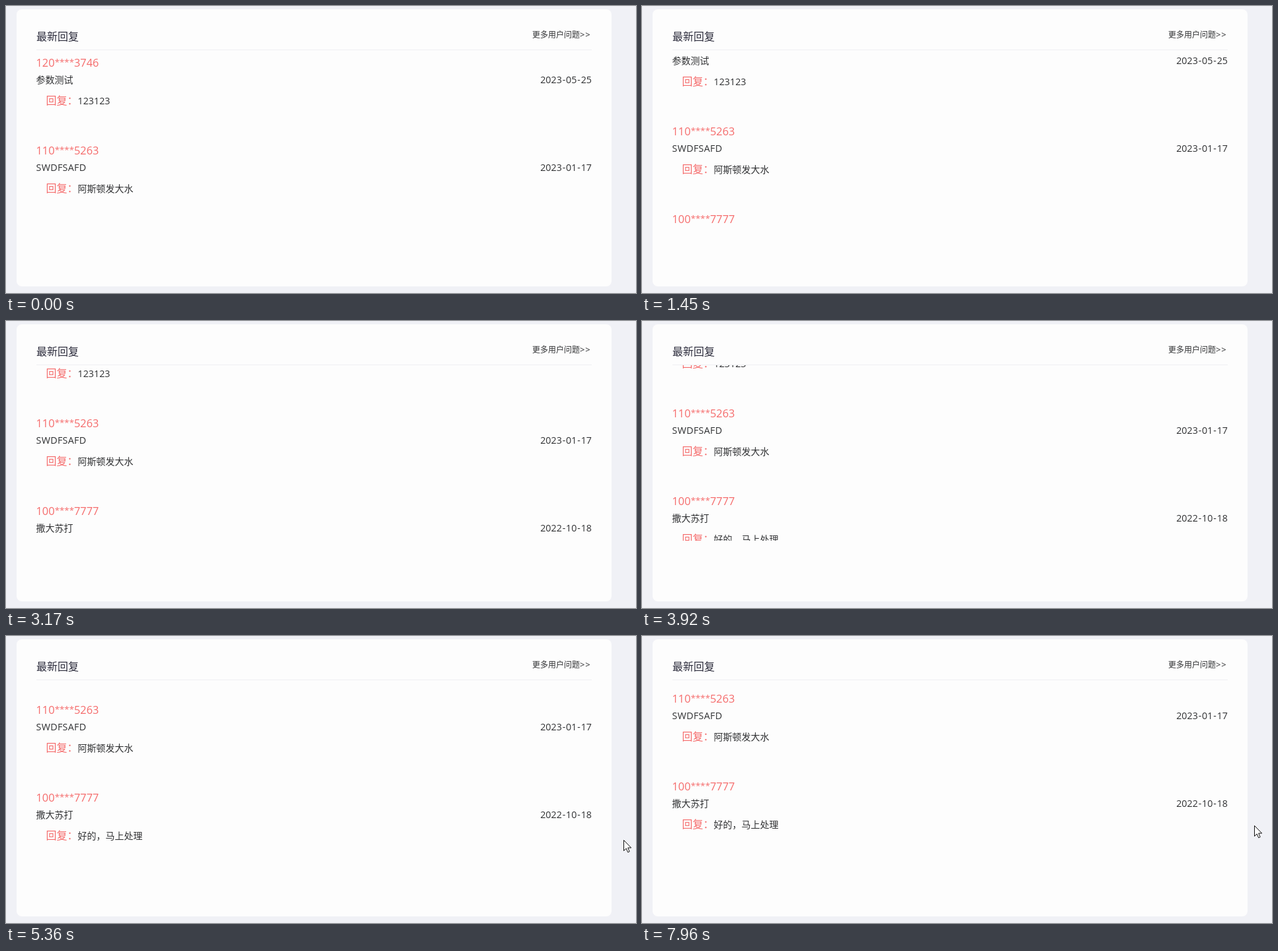
An HTML page for the animation above (8 s loop, 953 by 435 pixels).

```html
<!DOCTYPE html>
<html lang="zh-CN">
<head>
<meta charset="utf-8">
<title>最新回复</title>
<style>
html, body { margin: 0; width: 100%; height: 100%; overflow: hidden; background: #f0f1f6; }
svg { display: block; width: 953px; height: 435px; }
text { font: 14px "Open Sans", "Noto Sans CJK SC", "Noto Sans CJK", sans-serif; fill: #303133; }
.title { font-size: 16px; fill: #2c2c3c; }
.more { font-size: 12px; }
.arrows { font-size: 13px; letter-spacing: .9px; }
.accent { font-size: 16px; fill: #f56c6c; }
.phone { font-size: 16.4px; }
.mask { font-size: 13.3px; }
.latin { font-size: 14.3px; }
.caps { letter-spacing: .3px; }
</style>
</head>
<body>
<svg viewBox="0 0 953 435">
  <defs><clipPath id="view"><rect x="44" y="67" width="844" height="266"/></clipPath></defs>
  <rect width="953" height="435" fill="#f0f1f6"/>
  <rect x="16" y="5" width="900" height="420" rx="8" fill="#fdfdfd"/>
  <text class="title" x="46" y="52">最新回复</text>
  <text class="more" x="796" y="48">更多用户问题<tspan class="arrows">&gt;&gt;</tspan></text>
  <rect x="46" y="66" width="840" height="1" fill="#eff0f3"/>
  <g clip-path="url(#view)"><g id="list"></g></g>
  <path id="cursor" d="M.5 .5V16.5L4.2 13L6.7 18.8L9.2 17.7L6.7 12H11.7Z" fill="#fff" stroke="#111"/>
</svg>
<script>
const LOOP = 8000, ROW_HEIGHT = 133, MS_PER_PIXEL = 49.9;
const HOVER_START = 5910, HOVER_END = 7660;
const list = document.getElementById('list');
const cursor = document.getElementById('cursor');

const rows = [
  { phone: ['120', '3746'], question: '参数测试', date: '2023-05-25', reply: '123123' },
  { phone: ['110', '5263'], question: 'SWDFSAFD', date: '2023-01-17', reply: '阿斯顿发大水' },
  { phone: ['100', '7777'], question: '撒大苏打', date: '2022-10-18', reply: '好的，马上处理' }
];

function body(x, y, s) {
  const style = /^\d/.test(s) ? 'latin' : /^[A-Z]/.test(s) ? 'latin caps' : '';
  return `<text class="${style}" x="${x}" y="${y}">${s}</text>`;
}

// Hyphens get a little extra room on both sides.
const spacedDate = s => s.replace(/-(.)/g, '<tspan dx=".8">-</tspan><tspan dx=".8">$1</tspan>');

list.innerHTML = rows.map(({ phone, question, date, reply }, i) => `
  <g transform="translate(0 ${i * ROW_HEIGHT})">
    <text class="accent phone" x="45.5" y="92">${phone[0]}<tspan class="mask" dy="-2">****</tspan><tspan dy="2">${phone[1]}</tspan></text>
    ${body(45.5, 117, question)}
    <text class="latin" x="886" y="117" text-anchor="end">${spacedDate(date)}</text>
    <text class="accent" x="60.5" y="149">回复：</text>
    ${body(108.5, 149, reply)}
  </g>`).join('');

// Each move eases from the previous position to (x, y).
const entry = { x: 932, y: 411, start: 4960 };
const moves = [
  { start: 4960, end: 5080, x: 934, y: 309 },
  { start: 5800, end: 6340, x: 282, y: 241 },
  { start: 6670, end: 6940, x: 392, y: 254 },
  { start: 7170, end: 7780, x: 926, y: 287 }
];

const ease = p => p * p * (3 - 2 * p);
const clamp = p => Math.min(1, Math.max(0, p));

function pointerAt(t) {
  let { x, y } = entry;
  for (const move of moves) {
    const p = ease(clamp((t - move.start) / (move.end - move.start)));
    x += (move.x - x) * p;
    y += (move.y - y) * p;
  }
  return [Math.round(x), Math.round(y)];
}

// The list scrolls steadily and pauses while hovered.
function offsetAt(t) {
  const scrolled = Math.min(t, HOVER_START) + Math.max(0, t - HOVER_END);
  return Math.round(scrolled / MS_PER_PIXEL);
}

function render(t) {
  list.setAttribute('transform', `translate(0 ${-offsetAt(t)})`);
  cursor.setAttribute('transform', `translate(${pointerAt(t)})`);
  cursor.style.display = t < entry.start ? 'none' : '';
}

function tick() {
  render(performance.now() % LOOP);
  requestAnimationFrame(tick);
}
tick();
</script>
</body>
</html>
```
